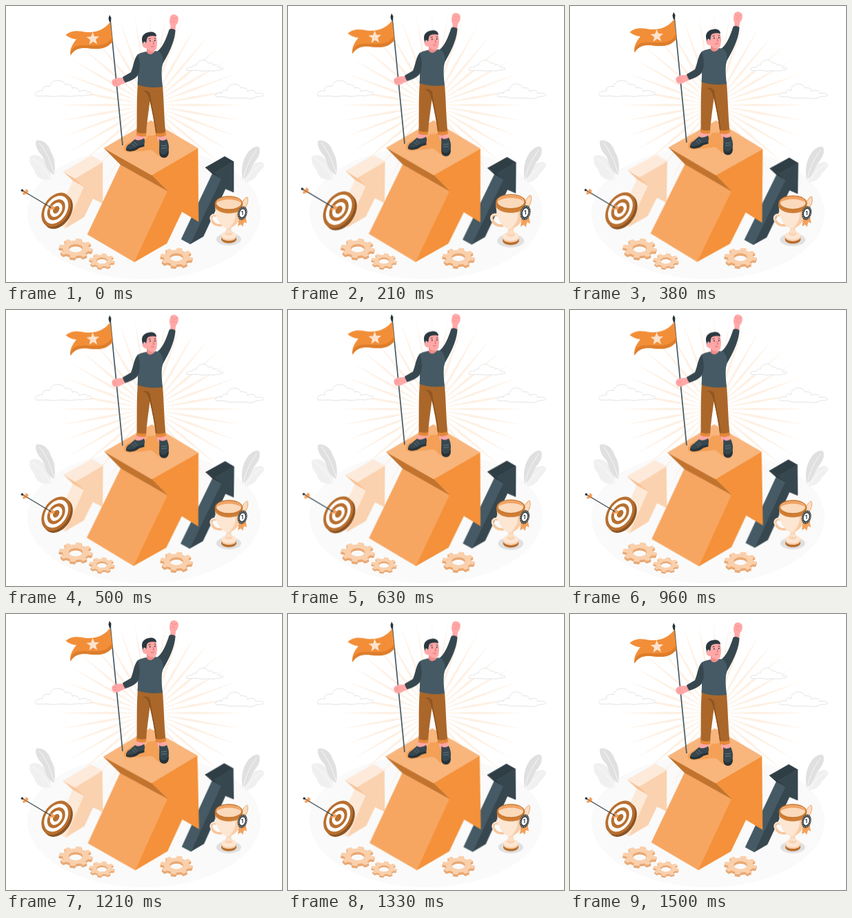
An HTML page for the animation above (1540 ms loop, 400 by 400 pixels).

```html
<!DOCTYPE html>
<html lang="en">
<head>
<meta charset="utf-8">
<title>Reaching the top</title>
<style>
  html, body { margin: 0; width: 100%; height: 100%; overflow: hidden; background: #fff; }
  svg { display: block; width: 100vw; height: 100vh; }
  #arrows { transform-origin: 206px 268.5px; }
  #target { transform-origin: 60px 295px; }
  #trophy { transform-origin: 324px 310px; }
</style>
</head>
<body>
<svg viewBox="0 0 400 400">
  <ellipse cx="200" cy="300" rx="169" ry="96" fill="#fafafa"/>
  <g id="rays" fill="#fef0e3"></g>

  <g fill="#fff" stroke="#e0e0e0" stroke-width=".9" stroke-linejoin="round">
    <path d="M43 130C40 127 46 122 53 123C52 117 58 115 63 117C65 106 82 105 86 114C91 112 96 115 96 119C101 117 106 120 106 124C111 121 117 122 118 125C123 123 126 127 123 129C116 128 113 131 108 130C101 129 96 132 89 131C78 129 74 132 65 131C57 129 50 132 43 130Z"/>
    <path d="M304 131C301 128 307 125 313 126C313 122 317 121 320 123C321 111 337 110 341 119C346 117 351 121 350 124C356 120 362 123 362 127C367 125 375 127 373 130C368 132 364 130 360 133C352 136 347 132 340 134C332 132 327 135 321 133C314 130 309 133 304 131Z"/>
    <path d="M262 93C261 90 266 88 270 89C270 86 274 85 276 86C278 77 290 76 293 83C297 81 301 84 300 86C304 84 308 86 308 89C312 88 316 90 314 92C308 92 305 95 299 94C292 93 288 95 282 94C276 92 269 95 262 93Z"/>
  </g>

  <path d="M65 251C52 254 43 248 41 237C35 232 33 222 35 218C43 213 52 218 56 225C63 231 65 242 65 251Z" fill="#f0f0f0"/>
  <path d="M70 245C58 239 57 228 53 218C46 211 41 200 44 195C53 193 62 200 65 211C71 221 72 233 70 245Z" fill="#e0e0e0"/>
  <path d="M48 198C58 210 64 224 70 243M38 221C50 227 58 238 64 250" fill="none" stroke="#fff" stroke-width=".7"/>
  <path d="M346 256C345 241 352 228 364 227C371 224 375 228 374 232C370 239 365 241 362 248C357 253 352 255 346 256Z" fill="#f0f0f0"/>
  <path d="M343 252C340 236 343 223 350 213C356 205 364 202 367 205C370 214 364 222 358 229C354 239 350 247 343 252Z" fill="#e0e0e0"/>
  <path d="M364 208C354 220 347 235 344 251M371 229C359 236 352 245 347 255" fill="none" stroke="#fff" stroke-width=".7"/>

  <g id="gears"></g>
  <g id="arrows"></g>

  <g id="target">
    <ellipse cx="75.500" cy="298.200" rx="18.500" ry="27" transform="rotate(33 75.500 298.200)" fill="#8c5423"/>
    <g id="rings" transform="translate(72.700 295.300) rotate(33)"></g>
    <path d="M23 267L70 295" stroke="#37474f" stroke-width="1.200"/>
    <path d="M62 288L70 291L70 295L60 295L66 292Z" fill="#f4a261"/>
    <path d="M27 269.500L29 265L32.500 268L31 272L25 274L24 271Z" fill="#f4a261"/>
    <path d="M25 268.200L32 272.400" stroke="#9b5b24" stroke-width="1"/>
    <circle cx="23.500" cy="267.300" r="1.700" fill="#263238"/>
  </g>

  <g id="trophy">
    <ellipse cx="322.800" cy="338" rx="18" ry="9" fill="#e0e0e0"/>
    <path d="M343 284C345 280 349 276 350 277.500C352 283 349 290 344 296L339 301" fill="#fbdcc0" stroke="#e9a76c" stroke-width="1"/>
    <path d="M305 304C298 301 295 307 299 312C302 317 308 319 314 317" fill="none" stroke="#f7c79c" stroke-width="3.600"/>
    <path d="M305 303C298 300 294 306 298 312" fill="none" stroke="#fdeadb" stroke-width="1.500"/>
    <path d="M312 332V337C313 345 333 345 334 337V332Z" fill="#f7cda7"/>
    <path d="M312 335C314 342 332 342 334 335V338.500C332 345.500 314 345.500 312 338.500Z" fill="#b86f2f"/>
    <ellipse cx="323" cy="332" rx="11" ry="6" fill="#fde6d2"/>
    <path d="M319 318H327C326 323 326 326 329 330C326 333.500 319 333.500 317 330C320 326 320 323 319 318Z" fill="#fad4b3"/>
    <ellipse cx="323" cy="326.500" rx="5" ry="2.500" fill="#fbe0c8"/>
    <path d="M303 287C303 305 308 316 317 321C321 323 325 323 329 320C339 313 343 303 343 287Z" fill="#fde6d2"/>
    <path d="M332 296C335 306 330 316 323 322C333 320 343 309 343 290Z" fill="#f9cda8"/>
    <path d="M302.800 286C302.800 289 303 291 303.500 293C311 303 335 303 342.500 293L343.200 286Z" fill="#d07f38"/>
    <ellipse cx="323" cy="286" rx="20.200" ry="10.700" fill="#c9792f"/>
    <ellipse cx="323" cy="285.500" rx="18" ry="8.800" fill="#fbd9bb"/>
    <path d="M305 285.500C308 274 338 274 341 285.500C333 279 313 279 305 285.500Z" fill="#f0a263"/>
    <path d="M338 306L336 319L340.500 316.500L343 320L345 313L349 315L347 304Z" fill="#f3a15c"/>
    <g transform="translate(342.600 300.300) rotate(14)">
      <ellipse rx="6.800" ry="10" fill="#37474f"/>
      <ellipse rx="5.600" ry="8.500" fill="none" stroke="#f6bd8c" stroke-width="1" stroke-dasharray="1.200 1.600"/>
      <ellipse rx="3.800" ry="6" fill="#fff"/>
    </g>
    <text x="342.400" y="303" text-anchor="middle" font-family="Inter, sans-serif" font-size="7.500" font-weight="700" fill="#263238">1</text>
  </g>

  <g id="man">
    <path d="M172 203C178 196 190 192 202 193L206 188L222 187L225 200C230 207 229 214 223 218C216 215 214 207 206 209C197 211 188 210 179 212C172 212 169 208 172 203Z" fill="#f4a056"/>
    <path d="M188 187H201V197H187ZM218 186H231L232 196H220Z" fill="#ffa8a7"/>
    <path d="M187 193C191 196 197 194 200 191.500C202 196 201 200 199 203L193 204.500C187 209 180 211 175 209C173 206 175 202 179 200Z" fill="#37474f"/>
    <path d="M174 206C178 209 186 207 191 203L200.500 200.500V203.500L193.500 205.500C187 211 178 212 174 209Z" fill="#263238"/>
    <path d="M183 199.500L187 203.500M186 197L190 201.500" stroke="#78909c" stroke-width=".7"/>
    <path d="M222 193C224 195.500 229 195.500 233 193C236 199 237 206 235 212C234 219 226 222 223 216C221 209 223 202 222 193Z" fill="#37474f"/>
    <path d="M222.500 211C225 217 232 217 235.500 209C237 215 234 220 229 220C224 220 222 216 222.500 211Z" fill="#263238"/>
    <path d="M225 203L233 202M225 206.500L233 205.500" stroke="#78909c" stroke-width=".7"/>

    <path d="M191 112L227 115C229 139 229 163 231.500 187C227 190 221 190 217.500 188C215.500 170 212 153 208.500 138C206.500 155 203.500 172 203 188C199 190 193 189 189.500 187C190 163 189 138 191 112Z" fill="#ab672a"/>
    <path d="M208.500 138C206 130 205 125 198 123C204 122 207 123 209 127C212 151 218 169 219 189L217.500 188C215.500 170 212 153 208.500 138Z" fill="#8f5522"/>
    <path d="M189.500 183Q196 186 203 184V188.500Q196 190.500 189.500 187.500ZM217 184Q224 186 231 183L231.800 187.500Q224 191 217.500 188.500Z" fill="#e8893a"/>

    <path d="M238 39L238.500 28C236 24 237 18 239 14C242 11 246 12 249 15C251 20 249 25 246 28L245 39Z" fill="#ffa8a7"/>
    <path d="M239 16L244 19L248 17M240 22L245 23" fill="none" stroke="#ee8480" stroke-width=".6"/>
    <path d="M219 66C227 60 232 48 236.500 34C239 32 243 33 245.500 35C245 47 240 62 227 84L219 78Z" fill="#37474f"/>
    <path d="M191 70C197 67 202 66 205 66C209 71 214 69 216 65L222 66C228 72 229 79 226 89C225 99 226 108 227 117C215 119 201 118 190.500 114C192 103 190 87 191 70Z" fill="#455a64"/>

    <path d="M151 19L169 202" stroke="#455a64" stroke-width="1.700"/>
    <path d="M150 13L152.500 17L152 23H149.800L148.500 18Z" fill="#263238"/>
    <path d="M86.500 42C96 34 105 36 117 38C132 39 144 33 151 23L154.500 51C147 62 135 63 122 61.500C108 59 99 62 93.500 71.500C92 62 96 56 102 48C97 48 92 46 86.500 42Z" fill="#f28e38"/>
    <path d="M154.500 51C147 62 135 63 122 61.500C108 59 99 62 93.500 71.500C93 66 96 60 104 57.500C121 54 144 64 153.500 45Z" fill="#dd7d2b"/>
    <path id="star" fill="#fde3cd"/>

    <path d="M171 104C165 104 160 104 156 106C152 108 153 113 156 116C160 118 164 116 167 114L174 111Z" fill="#ffa8a7"/>
    <path d="M155 110L161 109M155.500 113L161 112" stroke="#ee8480" stroke-width=".6"/>
    <path d="M191 70C185 77 185 87 181 96L169 103C170 106 171 109 173 111C180 109 186 106 190 102C195 94 195 83 191 70Z" fill="#37474f"/>

    <path d="M204 58V67C207 72 213 70 215 66L214 60Z" fill="#f18b87"/>
    <path d="M201 45C205 40 214 40 217 43C220 50 219 56 218 62C215 67 208 67 204 61C200 62 196 57 198 53C199 51 201 52 202 54Z" fill="#ffa8a7"/>
    <path d="M198 54C195 45 199 39 207 38C213 36.500 218 39 218 44C213 42.500 208 43 205 45.500C203.500 48 204 51 203 54C201 50.500 199 51 198.500 55Z" fill="#2b383f"/>
    <circle cx="208.800" cy="50.500" r=".9" fill="#263238"/>
    <circle cx="215.800" cy="50" r=".9" fill="#263238"/>
    <path d="M206.500 47.800L209.800 47M214.500 46.700L217.300 47.200" stroke="#263238" stroke-width=".8"/>
    <path d="M213 51L214.500 55L212.500 55.500M210 58.500Q213 60 215 58" fill="none" stroke="#c85f5b" stroke-width=".8"/>
  </g>
</svg>
<script>
const $ = id => document.getElementById(id);
// The hairline stroke closes seams between neighbouring faces
const poly = (pts, fill) =>
  `<polygon points="${pts}" fill="${fill}" stroke="${fill}" stroke-width=".5" stroke-linejoin="round"/>`;
const polar = (r, a) => [r * Math.cos(a), r * Math.sin(a)];
const fix = n => n.toFixed(2);

// Sunburst: 36 slim spindles
let rays = '';
for (let a = 0; a < 360; a += 10)
  rays += `<path transform="translate(209 143.500) rotate(${a})" d="M12 0L62 -1.700L133 0L62 1.700Z"/>`;
$('rays').innerHTML = rays;

$('rings').innerHTML = [[1, '#b86f2f'], [.82, '#fff'], [.61, '#b86f2f'], [.42, '#fff'], [.22, '#b86f2f']]
  .map(([s, c]) => `<ellipse rx="${18.5 * s}" ry="${27 * s}" fill="${c}"/>`).join('');

// Flat cogwheel seen at an angle, with a visible thickness
function gear(x, y, r, depth) {
  const teeth = 8, step = 2 * Math.PI / teeth, ry = .58;
  const pts = [];
  for (let i = 0; i < teeth; i++)
    for (const [o, k] of [[-.28, .79], [-.2, 1], [.2, 1], [.28, .79]]) {
      const [px, py] = polar(r * k, (i + o) * step + .2);
      pts.push(fix(px) + ' ' + fix(py * ry));
    }
  const hx = r * .42, hy = hx * ry;
  const hole = `M${-hx} 0A${hx} ${hy} 0 1 0 ${hx} 0A${hx} ${hy} 0 1 0 ${-hx} 0Z`;
  const d = `M${pts.join('L')}Z${hole}`;
  let s = '';
  for (let z = depth; z >= 0; z -= .5)
    s += `<path transform="translate(${x} ${y + z})" fill-rule="evenodd" d="${d}" fill="${z ? '#e9a974' : '#fad0ac'}"/>`;
  return s;
}
$('gears').innerHTML = gear(101, 351, 24.5, 3.5) + gear(139, 369, 18.5, 2.5) + gear(247, 364, 23.5, 3.5);

// Block arrow: left, back, right, front corners of the head, then the shaft
function arrow([l, b, r, f], [inL, inR, footL, foot, footR, neck, tip], [top, side, face, under]) {
  return poly([inL, inR, foot, footL], side) +
    poly([f, r, tip, neck, footR, foot, inR], face) +
    poly([l, f, inR, inL], under) +
    poly([l, b, r, f], top);
}
$('arrows').innerHTML =
  arrow([[83, 240], [124, 217], [140, 226], [100, 250]],
    [[97, 253], [113, 262], [70, 313], [86, 322], [113, 306], [126, 279], [140, 286]],
    ['#fdeadb', '#fde9d8', '#fad2af', '#f8c397']) +
  arrow([[289, 234], [317, 218], [330, 225.5], [302, 242]],
    [[299, 243], [312, 250], [254, 338], [267, 345], [286, 334], [318, 265], [330, 270]],
    ['#2f3d45', '#455a64', '#37474f', '#263238']) +
  arrow([[142, 206], [210, 166], [278, 206], [211, 245]],
    [[166, 230], [234, 268], [118, 331], [186, 371], [233, 344], [255, 298], [279, 312.5]],
    ['#f8b57c', '#f7a661', '#f4913a', '#c2742f']);

let star = '';
for (let i = 0; i < 10; i++) {
  const [x, y] = polar(i % 2 ? 4.2 : 9.8, i * Math.PI / 5 - Math.PI / 2 - .05);
  star += (i ? 'L' : 'M') + fix(126 + x) + ' ' + fix(47.5 + y);
}
$('star').setAttribute('d', star + 'Z');

// Each cycle takes 1500 ms, then rests until the 1540 ms loop ends
const LOOP = 1540, CYCLE = 1500 / LOOP;
function play(id, steps) {
  const frames = steps.map(([at, transform]) => ({ offset: at * CYCLE, transform }));
  frames.push({ offset: 1, transform: steps[steps.length - 1][1] });
  const a = $(id).animate(frames, { duration: LOOP, iterations: Infinity, easing: 'linear' });
  a.startTime = document.timeline.currentTime;
}
const beat = [[0, 1], [.1, 1.1], [.3, 1], [.4, 1], [.5, 1.1], [.6, 1], [1, 1]]
  .map(([at, s]) => [at, `scale(${s})`]);
play('man', [[0, 'translateY(0px)'], [.5, 'translateY(-8px)'], [1, 'translateY(0px)']]);
play('arrows', [[0, 'rotate(0deg)'], [.25, 'rotate(1deg)'], [.75, 'rotate(-1deg)'], [1, 'rotate(0deg)']]);
play('target', beat);
play('trophy', beat);
</script>
</body>
</html>
```
